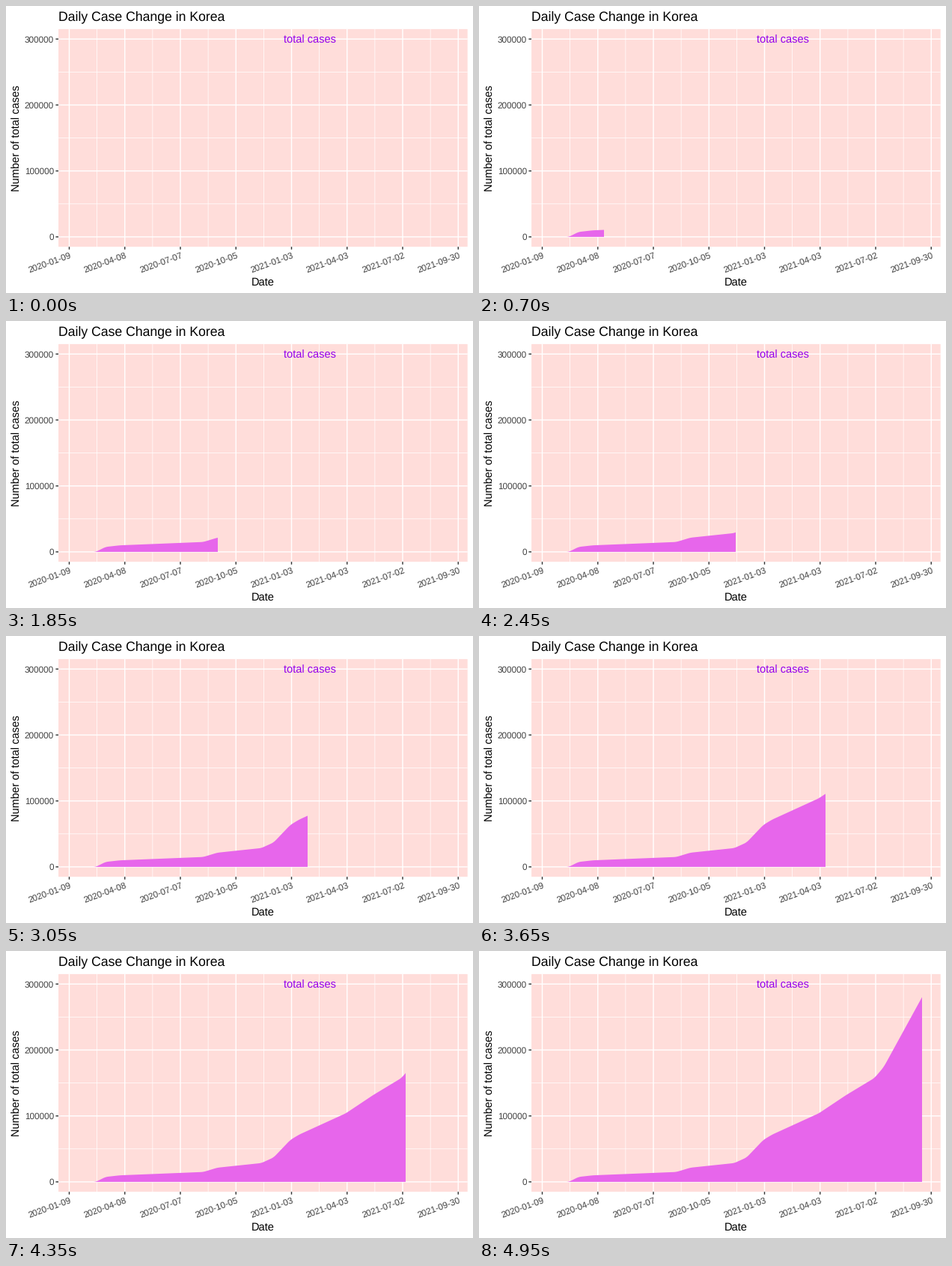
A matplotlib script that plays this animation: 624x384 px, repeating every 5000 ms.

```python
import numpy as np
import matplotlib.pyplot as plt
from matplotlib.animation import FuncAnimation
from matplotlib.patches import Polygon, Rectangle

W, H, DPI = 624, 384, 96
FRAMES, INTERVAL = 100, 50
LEFT, RIGHT, TOP, BOTTOM = 70.1, 616.7, 30.9, 322.1
START = np.datetime64("2020-01-09")
FIRST_DAY, LAST_DAY = 13, 615

plt.rcParams.update({"font.family": "Liberation Sans", "text.hinting": "none",
                     "path.snap": False})

# Turning points of the curve: (days since START, thousands of cases)
TURNS = [(43, 0), (59, 7.5), (82, 9.9), (217, 15), (240, 21.5), (311, 28.5),
         (331, 37), (358, 63.5), (372, 71.5), (448, 104), (492, 131.5),
         (538, 157.5), (553, 174), (625, 297)]


def px(day):
    return 84.5 + 0.825 * day


def py(thousands):
    return 308.9 - 0.8823 * thousands


def cases(day):
    """Straight runs between the turning points, rounded over nine days."""
    return np.mean([np.interp(day + s, *zip(*TURNS)) for s in range(-4, 5)],
                   axis=0)


def line(xs, ys, width, color="white", z=1):
    ax.plot(xs, ys, color=color, lw=width * 72 / DPI, zorder=z,
            solid_capstyle="butt")


def label(x, y, text, size, color="black", ha="center", angle=0):
    ax.text(x, y, text, fontsize=size, color=color, ha=ha, va="baseline",
            rotation=angle, rotation_mode="anchor", zorder=5)


fig = plt.figure(figsize=(W / DPI, H / DPI), dpi=DPI, facecolor="white")
ax = fig.add_axes([0, 0, 1, 1])
ax.set(xlim=(0, W), ylim=(H, 0))
ax.axis("off")
ax.add_patch(Rectangle((LEFT, TOP), RIGHT - LEFT, BOTTOM - TOP,
                       fc="#FFDDDA", lw=0, zorder=0))

# Minor grid
for day in range(45, 630, 90):
    line([px(day)] * 2, [TOP, BOTTOM], 0.71)
for value in range(50, 300, 100):
    line([LEFT, RIGHT], [py(value)] * 2, 0.71)

# Major grid, ticks and tick labels
for day in range(0, 631, 90):
    x = px(day)
    line([x, x], [TOP, BOTTOM], 1.42, z=2)
    line([x, x], [BOTTOM, BOTTOM + 3.67], 1.42, "#333333")
    label(x + 3.5, 336.3, str(START + day), 8.8, "#424242", "right", 20)
for value in range(0, 301, 100):
    y = py(value)
    line([LEFT, RIGHT], [y, y], 1.42, z=2)
    line([LEFT - 3.67, LEFT], [y, y], 1.42, "#333333")
    label(64, y + 4.3, str(value * 1000), 8.8, "#424242", "right")

label(LEFT, 19.6, "Daily Case Change in Korea", 13.2, ha="left")
label(343.4, 374, "Date", 11)
label(18.9, 176.5, "Number of total cases", 11, angle=90)
label(406, 50.3, "total cases", 11, "#9600EC")

days = np.arange(FIRST_DAY, LAST_DAY + 1)
curve_x, curve_y = px(days), py(cases(days))
area = Polygon([(0, 0)] * 3, closed=True, fc="#E766EB", lw=0, zorder=3)
ax.add_patch(area)


def update(frame):
    edge = min(round(97 + 5.02 * frame), 592)
    xs = np.append(curve_x[curve_x < edge], edge)
    top = np.column_stack([xs, np.interp(xs, curve_x, curve_y)])
    base = [(edge, py(0)), (curve_x[0], py(0))]
    area.set_xy(np.vstack([top, base]))
    return [area]


anim = FuncAnimation(fig, update, frames=FRAMES, interval=INTERVAL,
                     repeat=True, repeat_delay=0, blit=False)
plt.show()
```
